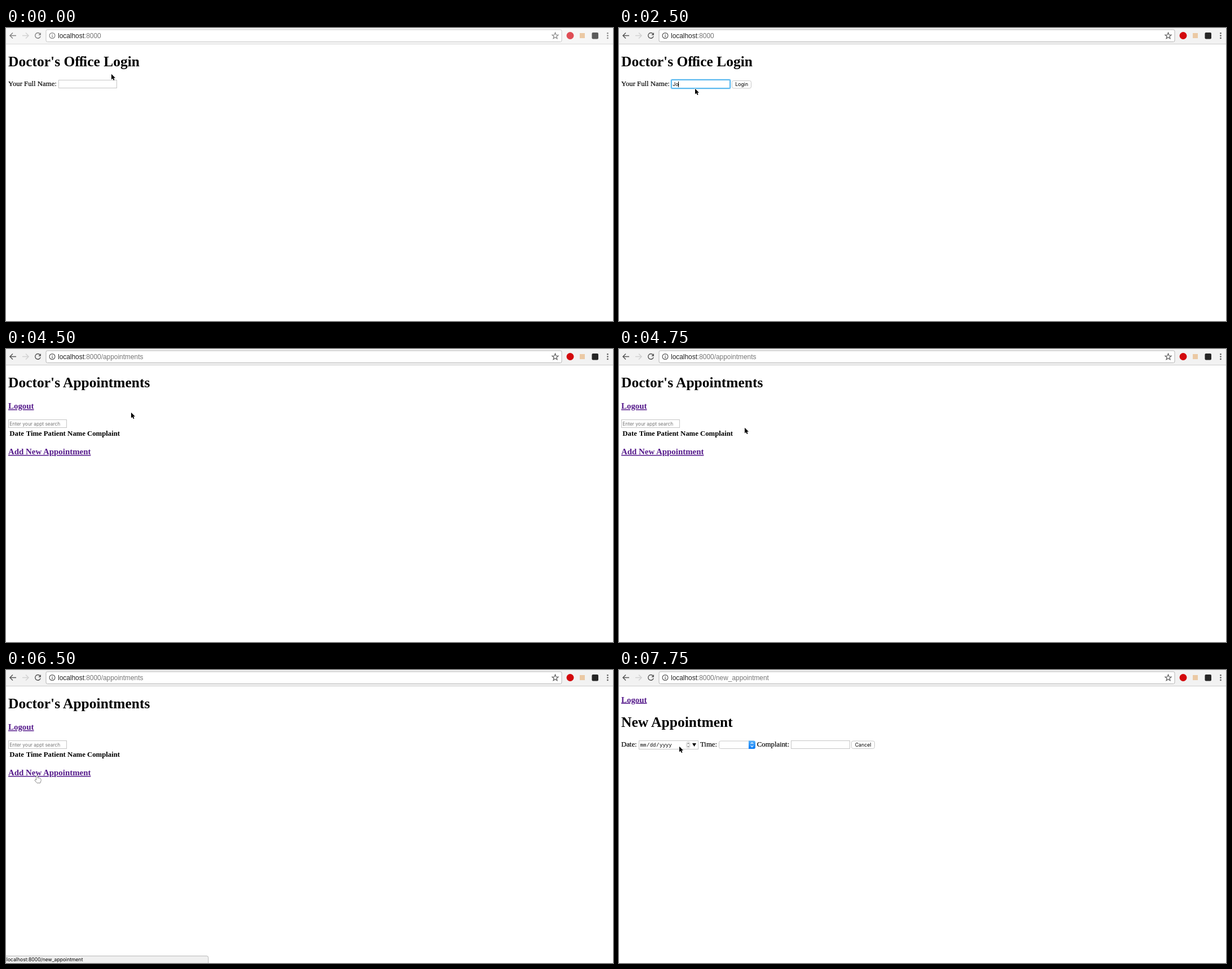
An HTML page that plays this animation: 1077x520 px, repeating every 8 s.

```html
<!DOCTYPE html>
<html lang="en">
<head>
<meta charset="utf-8">
<title>Doctor's Office</title>
<style>
html, body { margin: 0; width: 100%; height: 100%; overflow: hidden; background: #fff; }
svg { display: block; width: 1077px; height: 520px; }
text { font: 12.75px "Liberation Serif", serif; white-space: pre; }
.label { stroke: #000; stroke-width: .2; }
.h1 { font-size: 25.5px; font-weight: 700; }
.tight { letter-spacing: -1.1px; }
.th { font-weight: 700; }
.link { font-size: 14.9px; font-weight: 700; fill: #551a8b; text-decoration: underline; }
.ui { font: 8.77px Inter, sans-serif; }
.hint { font-size: 8.4px; fill: #757575; }
.mid { text-anchor: middle; }
.mono { font: 9px "Liberation Mono", monospace; }
.url { font: 11.9px "Liberation Sans", sans-serif; fill: #222; }
.url .path { fill: #777; }
.field { fill: #fff; stroke: #c6c6c6; }
.button { fill: #fff; stroke: #c8c8c8; }
.line { fill: none; stroke: var(--icon); stroke-width: 1.5; }
#bar { --icon: #585858; --tool: #f2f2f2; --edge: #cdcdcd; --box: #b4b4b4; --red: #d3080c; --dark: #262626; }
#bar.idle { --icon: #858585; --tool: #f6f6f6; --edge: #d9d9d9; --box: #c6c6c6; --red: #df4d55; --dark: #5c5c5c; }
</style>
</head>
<body>
<svg viewBox="0 0 1077 520">
  <defs>
    <linearGradient id="blue" x2="0" y2="1">
      <stop stop-color="#55b0fb"/><stop offset="1" stop-color="#0a7bf5"/>
    </linearGradient>
  </defs>

  <g id="bar">
    <rect width="1077" height="28" fill="var(--tool)"/>
    <rect y="28" width="1077" height="1" fill="var(--edge)"/>
    <path class="line" d="M18 13.5H7.5M12 8.5L7 13.5L12 18.5"/>
    <path class="line" style="stroke:#d2d2d2" d="M29 13.5H39.5M35 8.5L40 13.5L35 18.5"/>
    <path class="line" d="M60.3 10.4A4.8 4.8 0 1 0 61.2 14.6"/>
    <path d="M62 8V12.7H57.3Z" fill="var(--icon)"/>
    <rect x="71" y="3" width="915" height="21.5" rx="2.5" fill="#fff" stroke="var(--box)"/>
    <circle class="line" cx="82" cy="13.5" r="4.9" style="stroke-width:1.2"/>
    <path class="line" style="stroke-width:1.3" d="M82 12.7V16.5M82 10.4V11.7"/>
    <text class="url" x="92" y="17.6">localhost<tspan class="path" id="path"></tspan></text>
    <path id="star" class="line" style="stroke-width:1.2"/>
    <circle cx="1001" cy="13.5" r="6.5" fill="var(--red)"/>
    <rect x="1018" y="9" width="9" height="9" fill="#ebc9a4"/>
    <rect x="1039.5" y="8" width="11.5" height="11.5" rx="2" fill="var(--dark)"/>
    <g fill="var(--icon)">
      <circle cx="1067.5" cy="9.3" r="1.3"/><circle cx="1067.5" cy="13.6" r="1.3"/><circle cx="1067.5" cy="17.9" r="1.3"/>
    </g>
  </g>

  <g id="login">
    <text class="h1" x="4" y="68">Doctor's O<tspan class="tight">ff</tspan>ice Login</text>
    <text class="label" x="4" y="103">Your Full Name:</text>
    <rect class="field" x="93.5" y="92.5" width="103" height="14"/>
    <g id="focus">
      <rect x="91.5" y="90.5" width="107" height="18" rx="2" fill="none" stroke="#d3edfb"/>
      <rect x="93" y="92" width="104" height="15" rx="1" fill="#fff" stroke="#5cb9ef" stroke-width="2"/>
    </g>
    <text class="ui" id="name" x="95.3" y="103.2"></text>
    <rect id="caret" y="95" width="1" height="10"/>
    <g id="submit">
      <rect class="button" x="200.5" y="93.5" width="34" height="13.5" rx="3"/>
      <text class="ui mid" x="217.7" y="103.3">Login</text>
    </g>
  </g>

  <g id="list">
    <text class="h1" x="4" y="68">Doctor's Appointments</text>
    <text class="link" x="4" y="106">Logout</text>
    <rect class="field" x="4.5" y="125.5" width="103" height="14"/>
    <text class="ui hint" x="6.3" y="136">Enter your appt search</text>
    <text class="th" x="6.3" y="153.5">Date</text>
    <text class="th" x="35.7" y="153.5">Time</text>
    <text class="th" x="66.8" y="153.5">Patient Name</text>
    <text class="th" x="144" y="153.5">Complaint</text>
    <text class="link" x="4" y="187">Add New Appointment</text>
  </g>

  <g id="form">
    <text class="link" x="4" y="57.5">Logout</text>
    <text class="h1" x="4" y="101">New Appointment</text>
    <text class="label" x="4" y="136">Date:</text>
    <rect class="field" x="35.5" y="125.5" width="105" height="15"/>
    <text class="mono" y="136"><tspan x="37.5">mm</tspan><tspan x="49">/</tspan><tspan x="54.7">dd</tspan><tspan x="66">/</tspan><tspan x="72">yyyy</tspan></text>
    <g id="picker">
      <rect x="119.5" y="127.5" width="6.5" height="11" rx="3" fill="#fff" stroke="#cfcfcf"/>
      <path d="M121 131.8L122.8 129.5L124.6 131.8M121 134.4L122.8 136.7L124.6 134.4" fill="none" stroke="#555"/>
      <path d="M130 130H137L133.5 136Z"/>
    </g>
    <text class="label" x="144" y="136">Time:</text>
    <rect class="button" x="177.5" y="126" width="64" height="13.5" rx="3"/>
    <path d="M230 125.5H239Q242 125.5 242 128.5V137Q242 140 239 140H230Z" fill="url(#blue)"/>
    <path d="M233.8 131.2L236 128.8L238.2 131.2M233.8 134.2L236 136.6L238.2 134.2" fill="none" stroke="#fff" stroke-width="1.1"/>
    <text class="label" x="244.8" y="136">Complaint:</text>
    <rect class="field" x="305.5" y="125.5" width="104" height="14"/>
    <rect class="button" x="412.5" y="126" width="41" height="13.5" rx="3"/>
    <text class="ui mid" x="433" y="136">Cancel</text>
  </g>

  <g id="status">
    <path d="M-1 507.5H356Q359 507.5 359 510.5V521H-1Z" fill="#f0f0f0" stroke="#b9b9b9"/>
    <text class="ui" style="font-size:8.6px" x="0.8" y="517.4">localhost:8000/new_appointment</text>
  </g>

  <g id="pointer" stroke="#fff" stroke-linejoin="round" paint-order="stroke">
    <path id="arrow" stroke-width="1.4" transform="translate(0 .7) scale(.88)" d="M0 0V11.2L2.6 8.9L4.4 12.9L6.3 12.1L4.6 8.1H8Z"/>
    <path id="hand" fill="#fff" stroke="#000" stroke-width=".9"
      d="M-1 7V1Q0 -.6 1.1 1V5Q2.2 4 3.2 5.3Q4.3 4.5 5.2 5.8Q6.6 5.4 6.8 7V10L5.5 13.5H0L-3.8 8.6Q-3.4 6.8 -1 8.6Z"/>
  </g>
</svg>
<script>
const $ = id => document.getElementById(id);
const show = (id, on) => $(id).style.display = on ? '' : 'none';
const LOOP = 8000, TICK = 250, FULL_NAME = 'Joel Marbe';

// Pointer stops: tick, x, y
const stops = [
  [0, 187, 81], [1, 175, 88], [2, 150, 100], [3, 135, 107],
  [16, 170, 106], [17, 214, 101], [18, 222, 112], [19, 223, 139],
  [20, 180, 130], [21, 90, 123], [22, 34, 140], [24, 66, 173],
  [25, 58, 184], [26, 55, 187], [29, 62, 176], [30, 88, 152], [31, 107, 135]
];

const starPoints = Array.from({ length: 10 }, (_, i) => {
  const a = i * Math.PI / 5, r = i % 2 ? 2.5 : 5.8;
  return (974.5 + r * Math.sin(a)).toFixed(2) + ' ' + (14 - r * Math.cos(a)).toFixed(2);
});
$('star').setAttribute('d', 'M' + starPoints.join('L') + 'Z');

function draw(tick) {
  const page = tick < 18 ? 'login' : tick < 28 ? 'list' : 'form';
  for (const id of ['login', 'list', 'form']) show(id, id === page);
  $('path').textContent = ':8000' + { login: '', list: '/appointments', form: '/new_appointment' }[page];

  const focused = tick >= 4;
  $('bar').setAttribute('class', focused ? '' : 'idle');
  show('focus', focused);

  const typed = Math.round(FULL_NAME.length * Math.min(1, Math.max(0, (tick - 9) / 6)));
  $('name').textContent = FULL_NAME.slice(0, typed);
  show('submit', typed > 0);
  show('caret', focused && tick !== 6 && tick !== 7);
  if (page === 'login') {
    $('caret').setAttribute('x', Math.round(95 + (typed ? $('name').getComputedTextLength() : 0)));
  }

  const hover = tick >= 25 && tick < 28;
  show('status', tick >= 25 && tick < 29);
  show('picker', tick === 31);
  show('hand', hover);
  show('arrow', !hover);
  const [, x, y] = stops.filter(s => s[0] <= tick).pop();
  $('pointer').setAttribute('transform', `translate(${x} ${y})`);
}

const start = performance.now();
let last = -1;
function loop() {
  const tick = Math.floor((performance.now() - start) % LOOP / TICK);
  if (tick !== last) draw(last = tick);
  requestAnimationFrame(loop);
}
loop();
</script>
</body>
</html>
```
